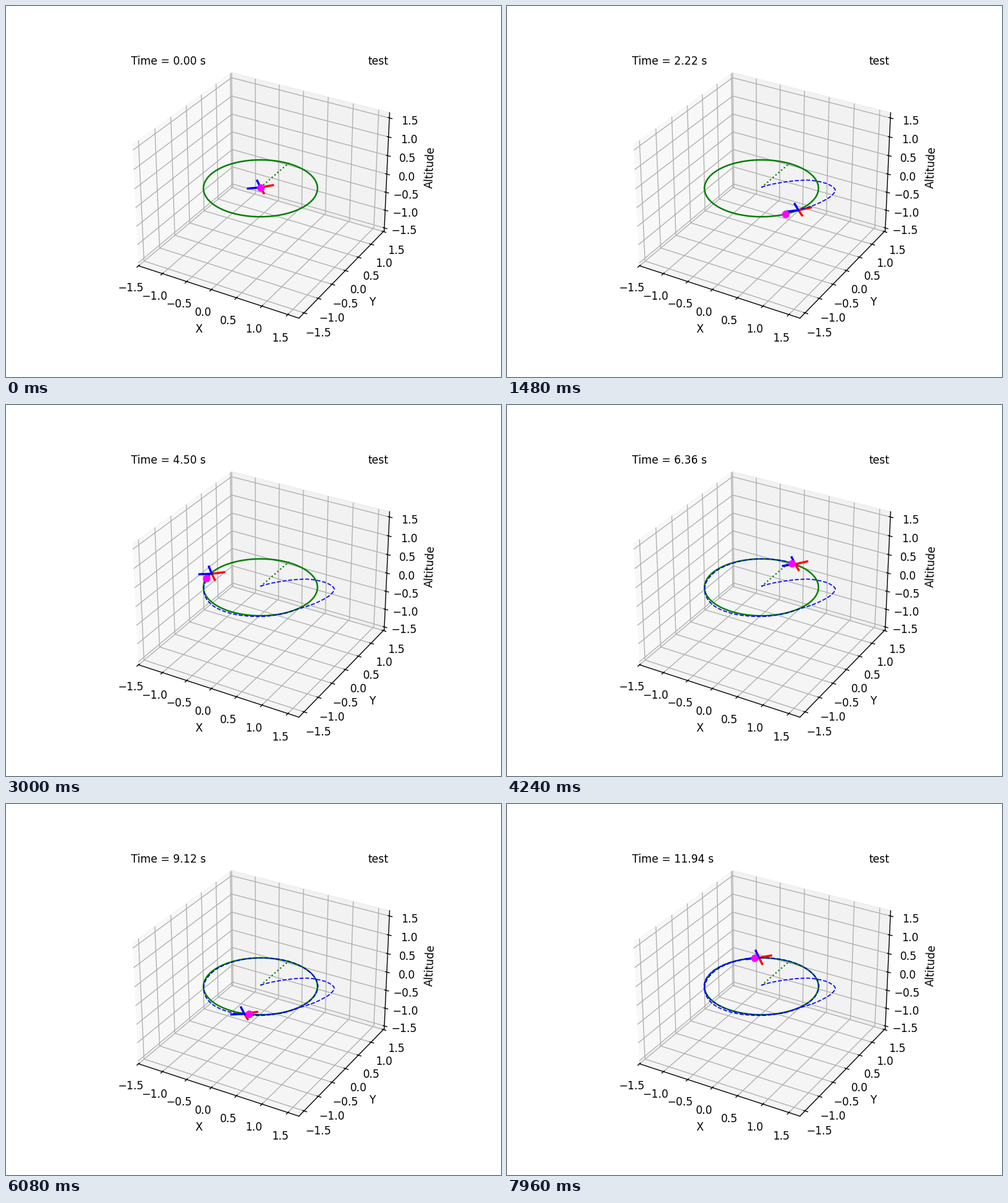
These frames come from a looping animation (768 by 576 pixels, 8000 ms). A matplotlib script:

```python
import numpy as np
import matplotlib.pyplot as plt
from matplotlib.animation import FuncAnimation

FRAMES, INTERVAL = 200, 40
STEP = 0.06              # simulated seconds per frame
SUB = 3                  # path samples per frame
ARM, RISE = 0.16, 0.015  # motor offsets from the body centre
GRAVITY = 9.81
TARGET_LAG = 0.025

# Flight before it settles: time, clockwise angle from +Y (degrees), radius
KEYS = np.array([
    (0.00, 0, 0), (0.25, 22, 0.08), (0.54, 32.4, 0.325), (0.80, 39, 0.675),
    (0.97, 43.5, 0.895), (1.13, 50.5, 1.09), (1.26, 55.6, 1.199),
    (1.41, 63.3, 1.292), (1.58, 72.8, 1.256), (1.79, 84.1, 1.164),
    (2.04, 98.4, 1.066), (2.22, 111, 1.007), (2.37, 125, 1.01),
    (2.52, 139.5, 1.015), (2.80, 159.4, 1.03), (3.10, 178.6, 1.05),
    (3.40, 197, 1.055), (3.78, 220.6, 1.02), (4.10, 241.9, 0.99),
    (4.50, 267.5, 0.978), (5.04, 297.8, 0.985), (5.60, 327, 1.0),
    (6.00, 348.3, 1.005), (6.36, 367, 1.006)])


def on_circle(angle, radius=1.0):
    """Clockwise position, starting at +Y."""
    return np.stack([radius * np.sin(angle), radius * np.cos(angle)], axis=-1)


def settled(t):
    return on_circle(t + 0.056, 1.006)


def hermite(t, tk, vk):
    slope = np.gradient(vk, tk, axis=0)
    k = np.clip(np.searchsorted(tk, t, side="right") - 1, 0, len(tk) - 2)
    h = (tk[k + 1] - tk[k])[:, None]
    s = (t - tk[k])[:, None] / h
    return ((1 + 2 * s) * (1 - s) ** 2 * vk[k] + s * (1 - s) ** 2 * h * slope[k]
            + s ** 2 * (3 - 2 * s) * vk[k + 1] - s ** 2 * (1 - s) * h * slope[k + 1])


def flight(t):
    tk = KEYS[:, 0]
    error = on_circle(np.radians(KEYS[:, 1]), KEYS[:, 2]) - settled(tk)
    tk = np.append(tk, [7.2, 8.0])
    error = np.vstack([error, np.zeros((2, 2))])
    return settled(t) + hermite(np.minimum(t, tk[-1]), tk, error)


def motors(pos):
    """Arm points, tilted so that the thrust points to the circle's centre."""
    up = np.array([-pos[0], -pos[1], GRAVITY])
    up /= np.linalg.norm(up)
    side = np.cross(up, [1, 0, 0])
    side /= np.linalg.norm(side)
    rot = np.column_stack([np.cross(side, up), side, up])
    body = np.array([(ARM, -ARM, RISE), (0, 0, 0), (ARM, ARM, RISE),
                     (-ARM, ARM, RISE), (0, 0, 0), (-ARM, -ARM, RISE)])
    return rot @ body.T + np.array([[pos[0]], [pos[1]], [0]])


path = flight(np.arange(FRAMES * SUB) * STEP / SUB)

fig = plt.figure(figsize=(6.4, 4.8), dpi=120)
ax = fig.add_subplot(projection="3d")

loop = on_circle(np.linspace(0, 2 * np.pi, 315))
ax.plot([0, 0], [0, 1], [0, 0], ":", lw=1.3, color="green")
ax.plot(loop[:, 0], loop[:, 1], 0 * loop[:, 0], lw=1.45, color="green")
front, = ax.plot([], [], [], lw=2, color="red")
rear, = ax.plot([], [], [], lw=2, color="blue")
trail, = ax.plot([], [], [], "--", lw=1, color="blue")
target, = ax.plot([], [], [], "o", color="magenta")

HALF = 1.6075
for set_lim, mid in ((ax.set_xlim3d, 0.103), (ax.set_ylim3d, -0.07),
                     (ax.set_zlim3d, 0.03)):
    set_lim(mid - HALF, mid + HALF)
ax.set_xlabel("X")
ax.set_ylabel("Y")
ax.set_zlabel("Altitude")

clock = ax.text2D(0.05, 0.95, "", transform=ax.transAxes)
ax.text2D(0.95, 0.95, "test", transform=ax.transAxes, ha="right")


def update(i):
    t = i * STEP
    n = i * SUB
    pts = motors(path[n])
    front.set_data_3d(*pts[:, :3])
    rear.set_data_3d(*pts[:, 3:])
    trail.set_data_3d(path[:n, 0], path[:n, 1], np.zeros(n))
    x, y = on_circle(t - TARGET_LAG) if i else (0, 0)
    target.set_data_3d([x], [y], [0])
    clock.set_text(f"Time = {t:.2f} s")
    return front, rear, trail, target, clock


def init():
    return update(0)


anim = FuncAnimation(fig, update, frames=FRAMES, init_func=init,
                     interval=INTERVAL, repeat=True, blit=False)
plt.show()
```
